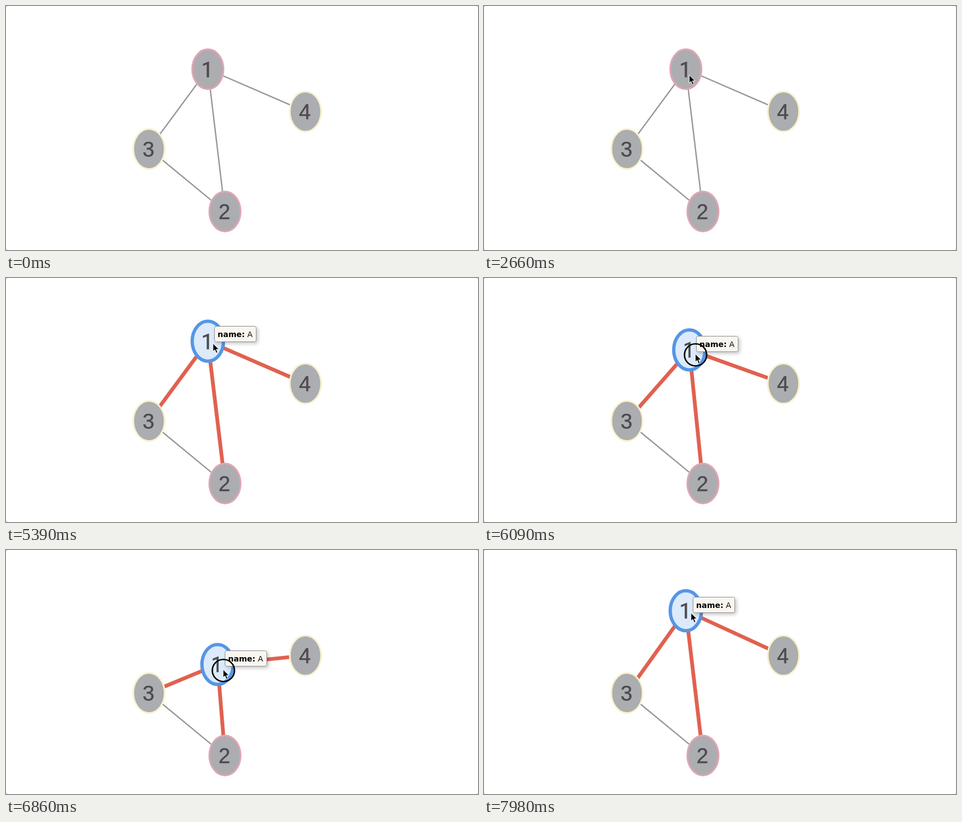
Write an HTML page that moves like this. It is 850 px wide and 442 px high and loops after 8000 ms.

```html
<!DOCTYPE html>
<html lang="en">
<head>
<meta charset="utf-8">
<title>Graph node selection and drag</title>
<style>
  html, body { margin: 0; width: 100%; height: 100%; overflow: hidden; background: #808080; }
  svg { display: block; width: 100vw; height: 100vh; }
  .label {
    font: 38px "Liberation Sans", Arial, sans-serif; text-anchor: middle;
    fill: #4c4c4f; stroke: #4c4c4f; stroke-width: .5;
  }
  /* A figure one without a foot */
  #nodes g:first-child .label { font-family: Roboto, sans-serif; }
  .tip { font: 14px "DejaVu Sans", Verdana, sans-serif; fill: #111; }
  .tip .key { font-weight: bold; fill: #000; }
  .tip rect { fill: #f9f6f0; stroke: #8f8f8f; filter: drop-shadow(3px 3px 3px rgba(0, 0, 0, .22)); }
  .press { fill: none; stroke: #000; stroke-width: 2.6; }
  .arrow { fill: #000; stroke: #fff; stroke-width: 1; }
</style>
</head>
<body>
<svg viewBox="0 0 850 442">
  <rect width="850" height="442" rx="2.5" fill="#fff"/>
  <g id="edges"></g>
  <g id="nodes"></g>
  <g id="tip" class="tip">
    <rect x=".5" y=".5" width="75" height="28" rx="3"/>
    <text x="6" y="20"><tspan class="key">name:</tspan> A</text>
  </g>
  <g id="cursor">
    <circle id="press" class="press" cx=".5" cy="1.2" r="20"/>
    <path class="arrow" d="M0-.5V14L3.3 11 5.8 17 8.4 15.9 5.9 10.2H10.6Z"/>
  </g>
</svg>
<script>
const LOOP = 8000, STEP = 70;
const ENTER = 700, FIRST_CLICK = 2870, TIP_SHOWN = 3290;
const SECOND_CLICK = 4130, CLICK_LENGTH = 210;
const SELECT = 4480, SELECT_LENGTH = 770;
const GRAB = 5460, RELEASE = 7910, DRAG_LAG = 50;

const PINK = [227, 165, 179], CREAM = [249, 241, 204], BLUE = [85, 150, 230];
const GRAY = [172, 173, 177], PALE = [220, 234, 252];
const LINE = [151, 151, 151], RED = [225, 97, 80];

const nodes = {
  1: { x: 363.5, y: 114.5, ring: PINK },
  2: { x: 394.3, y: 372.3, ring: PINK },
  3: { x: 257.5, y: 259, ring: CREAM },
  4: { x: 539.3, y: 191.2, ring: CREAM }
};
const edges = [[1, 3], [1, 2], [1, 4], [3, 2]].map(([from, to]) => ({ from, to }));

// Key points of the pointer: enter, pause, hover, click, drag down, drag back up.
const pointerPath = [
  { t: ENTER, x: 505, y: 440 },
  { t: 1540, x: 529, y: 304 },
  { t: 1750, x: 529, y: 304 },
  { t: 2660, x: 369.5, y: 125.5 },
  { t: 3920, x: 370, y: 126 },
  { t: 4340, x: 372.8, y: 119 },
  { t: 5800, x: 372.8, y: 119 },
  { t: 6090, x: 380.5, y: 138 },
  { t: 6860, x: 391, y: 217 },
  { t: 7180, x: 396, y: 222 },
  { t: 7520, x: 372.8, y: 114.5 }
];

const byId = id => document.getElementById(id);
const clamp = v => Math.min(1, Math.max(0, v));
const ease = p => (1 - Math.cos(Math.PI * clamp(p))) / 2;
const mix = (a, b, p) => a + (b - a) * p;
const rgb = color => `rgb(${color.map(Math.round)})`;
const blend = (a, b, p) => rgb(a.map((v, i) => mix(v, b[i], p)));
const place = (el, x, y) => el.setAttribute("transform", `translate(${x} ${y})`);
const show = (el, on) => { el.style.display = on ? "" : "none"; };

function set(el, attrs) {
  for (const key in attrs) el.setAttribute(key, attrs[key]);
  return el;
}

function add(parent, tag, attrs = {}) {
  const el = document.createElementNS("http://www.w3.org/2000/svg", tag);
  parent.append(set(el, attrs));
  return el;
}

function pointerAt(t) {
  const last = pointerPath.length - 1;
  const next = pointerPath.findIndex(key => key.t > t);
  const b = pointerPath[next < 0 ? last : next];
  const a = pointerPath[next < 0 ? last - 1 : Math.max(0, next - 1)];
  const p = a === b ? 0 : clamp((t - a.t) / (b.t - a.t));
  return { x: mix(a.x, b.x, p), y: mix(a.y, b.y, p) };
}

// The grabbed node trails the pointer slightly.
function draggedAt(t) {
  const { x, y } = pointerAt(t - DRAG_LAG);
  return { x: x - 9.3, y: y - 4.5 };
}

function tipAt(t, node) {
  if (t >= GRAB) return { x: Math.round(node.x + 12.5), y: Math.round(node.y - 25.5) };
  return { x: 375, y: t < SECOND_CLICK + CLICK_LENGTH ? 94 : 87 };
}

function isPressed(t) {
  const clicked = start => t >= start && t < start + CLICK_LENGTH;
  return clicked(FIRST_CLICK) || clicked(SECOND_CLICK) || (t >= GRAB && t < RELEASE);
}

for (const edge of edges) {
  const a = nodes[edge.from], b = nodes[edge.to];
  edge.el = add(byId("edges"), "line", {
    x1: a.x, y1: a.y, x2: b.x, y2: b.y, stroke: rgb(LINE), "stroke-width": 2.4
  });
}

for (const [id, node] of Object.entries(nodes)) {
  node.el = add(byId("nodes"), "g");
  node.shape = add(node.el, "ellipse", {
    rx: 28.2, ry: 36.2, fill: rgb(GRAY), stroke: rgb(node.ring), "stroke-width": 3
  });
  add(node.el, "text", { class: "label", x: -1, y: 14 }).textContent = id;
  place(node.el, node.x, node.y);
}

function render(t) {
  const node = t < GRAB ? nodes[1] : draggedAt(t);
  const selected = ease((t - SELECT) / SELECT_LENGTH);
  const pointer = pointerAt(t), tip = tipAt(t, node);

  place(nodes[1].el, node.x, node.y);
  set(nodes[1].shape, {
    fill: blend(GRAY, PALE, selected),
    stroke: blend(PINK, BLUE, selected),
    "stroke-width": mix(3, 6, selected)
  });
  for (const edge of edges.filter(e => e.from === 1)) {
    set(edge.el, {
      x1: node.x, y1: node.y,
      stroke: blend(LINE, RED, selected),
      "stroke-width": mix(2.4, 6.8, selected)
    });
  }

  place(byId("tip"), tip.x, tip.y);
  place(byId("cursor"), pointer.x, pointer.y);
  show(byId("tip"), t >= TIP_SHOWN);
  show(byId("cursor"), t >= ENTER);
  show(byId("press"), isPressed(t));
}

const start = performance.now();
function tick() {
  const t = (performance.now() - start) % LOOP;
  render(Math.floor(t / STEP) * STEP);
  requestAnimationFrame(tick);
}
tick();
</script>
</body>
</html>
```
